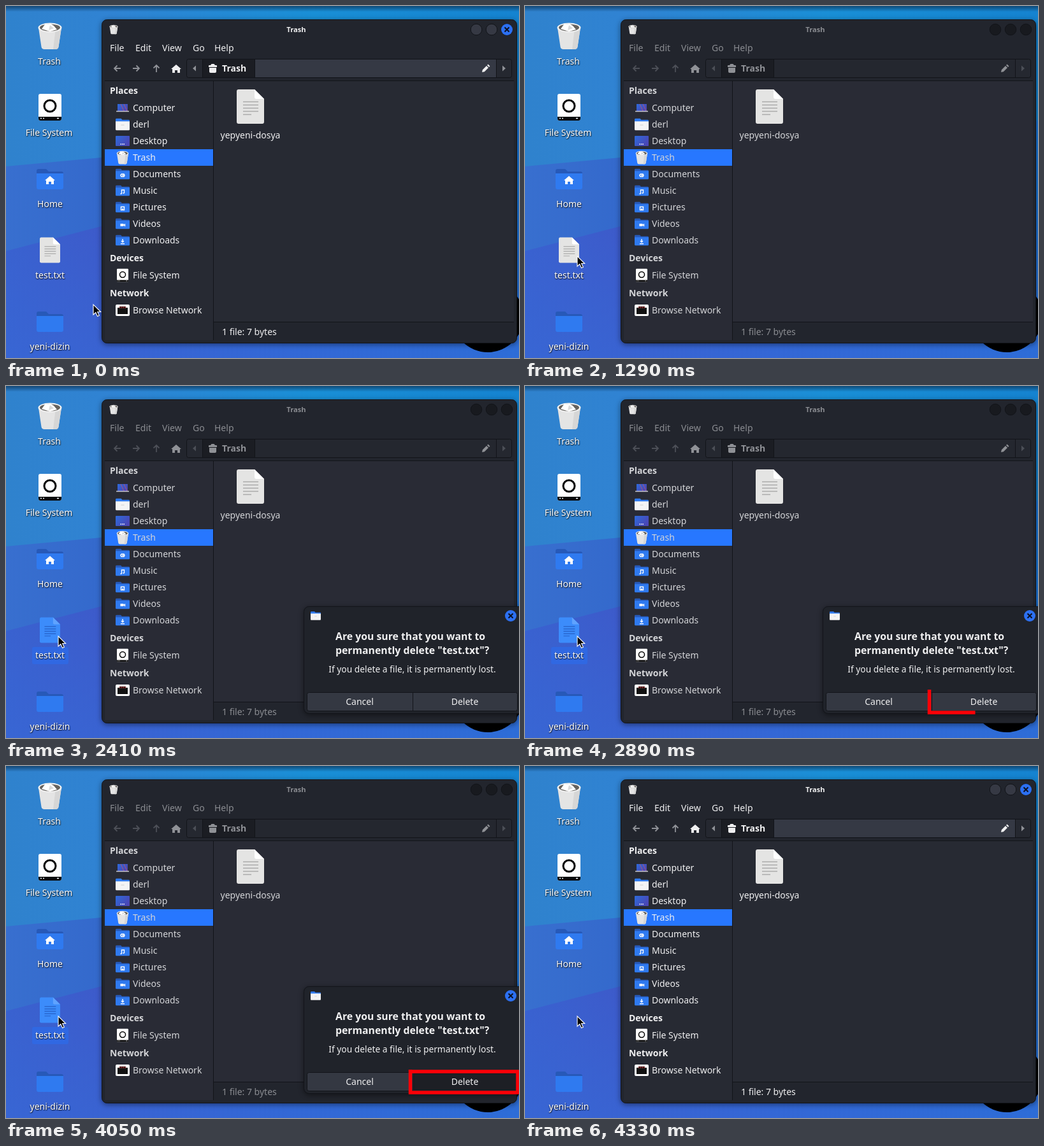
An HTML page that plays this animation: 805x553 px, repeating every 6.27 s.

```html
<!DOCTYPE html>
<html lang="en">
<head>
<meta charset="utf-8">
<title>Permanent delete</title>
<style>
html, body { margin: 0; width: 100%; height: 100%; overflow: hidden; background: #2f80d0; }
svg.stage { display: block; }
text { font: 14px "Noto Sans", "Open Sans", sans-serif; fill: #f0f0f1; white-space: pre; }
text.b { font-weight: 700; }
text.ask { font-size: 15.8px; }
.mid { text-anchor: middle; }
.desk text { fill: #fff; text-anchor: middle; text-shadow: 0 1px 2px #000a, 1px 1px 1px #0008; }
.head { fill: var(--head); }
.tool { fill: var(--tool); }
.body { fill: var(--body); }
.arrow { fill: none; stroke: var(--nav); stroke-width: 1.8; }
.win { filter: drop-shadow(0 2px 4px #0007); }
.key text { font-family: "Liberation Sans", Arial, sans-serif; fill: #000; text-anchor: middle; }
</style>
</head>
<body>
<svg class="stage" width="805" height="553" viewBox="0 0 805 553">
<defs>
  <linearGradient id="sky"><stop offset="0" stop-color="#2f82cd"/><stop offset=".2" stop-color="#3083d3"/><stop offset=".6" stop-color="#198fd6"/><stop offset="1" stop-color="#1583d0"/></linearGradient>
  <linearGradient id="band"><stop offset="0" stop-color="#386fcf"/><stop offset=".19" stop-color="#3469cc"/><stop offset="1" stop-color="#1b78d6"/></linearGradient>
  <linearGradient id="low"><stop offset="0" stop-color="#3a60ce"/><stop offset=".19" stop-color="#3e58c8"/><stop offset=".55" stop-color="#2a68d6"/><stop offset="1" stop-color="#1a76d8"/></linearGradient>
  <linearGradient id="lift" x2="0" y2="1"><stop offset=".3" stop-color="#3768d6" stop-opacity="0"/><stop offset="1" stop-color="#3768d6" stop-opacity=".7"/></linearGradient>
  <linearGradient id="shade" x2="0" y2="1"><stop offset="0" stop-color="#0b3458" stop-opacity=".75"/><stop offset="1" stop-color="#0b3458" stop-opacity="0"/></linearGradient>
  <linearGradient id="screen" x2="1" y2=".6"><stop offset="0" stop-color="#2d6bdc"/><stop offset="1" stop-color="#4a46b4"/></linearGradient>
  <linearGradient id="cap" x2="0" y2="1"><stop offset="0" stop-color="#c6c7c9"/><stop offset="1" stop-color="#b5b6b8"/></linearGradient>

  <symbol id="trash" viewBox="0 0 40 44">
    <path d="M2 9 6.500 39q.5 4 5 4h17q4.500 0 5-4L38 9z" fill="#e4e4e4"/>
    <path d="M29 9h9l-4.500 30q-.5 4-5 4H25z" fill="#d6d6d6"/>
    <ellipse cx="20" cy="9" rx="18.500" ry="7.500" fill="#f2f2f2"/>
    <ellipse cx="20" cy="9" rx="16" ry="5.500" fill="#65625e"/>
    <path d="m7 11 5-7 9-1 5 3 5 6-11 3z" fill="#fff"/>
    <path d="m20 5 6 5-8 3z" fill="#d9d9d9"/>
  </symbol>
  <symbol id="disk" viewBox="0 0 36 42">
    <rect width="36" height="42" rx="3" fill="#fff"/>
    <circle cx="18" cy="19" r="9" fill="none" stroke="#000" stroke-width="3"/>
    <path d="M0 36h36v3q0 3-3 3H3q-3 0-3-3z" fill="#0a0a0a"/>
    <path d="M3 38.500h2m2 0h2m20 0h3" stroke="#fff" stroke-width="1.500"/>
  </symbol>
  <symbol id="folder" viewBox="0 0 42 32">
    <path d="M0 3q0-3 3-3h12l4 4h20q3 0 3 3v10H0z" fill="#2759b8"/>
    <path d="M0 7h42v22q0 3-3 3H3q-3 0-3-3z" fill="#2f7af0"/>
  </symbol>
  <symbol id="user" viewBox="0 0 42 36">
    <path d="M0 3q0-3 3-3h13l4 4h19q3 0 3 3v10H0z" fill="#2f7af0"/>
    <path d="M0 9h42v24q0 3-3 3H3q-3 0-3-3z" fill="#f4f4f5"/>
    <path d="M16 20h10" stroke="#ddd" stroke-width="3"/>
  </symbol>
  <symbol id="sheet" viewBox="0 0 43 54">
    <path d="M3 0h25l15 15v36q0 3-3 3H3q-3 0-3-3V3q0-3 3-3z" fill="var(--paper, #e4e4e3)"/>
    <path d="m28 0 15 15H31q-3 0-3-3z" fill="var(--fold, #fff)"/>
    <path d="M10 19.500h24M10 24.500h24M10 29.500h24M10 34.500h24M10 39.500h13" stroke="var(--rule, #aaa)" stroke-width="1.500"/>
  </symbol>
  <path id="home" d="M0-7 8 0H6v6H2V2h-4v4h-4V0h-2z"/>
  <g id="laptop">
    <path d="M-8-6H8V5H-8z" fill="url(#screen)"/>
    <path d="m-3-6 5 11M2-6 7 5" stroke="#c0586a" stroke-width=".8"/>
    <path d="M-10 5.500h20" stroke="#c9cad0" stroke-width="1.500"/>
  </g>
  <g id="desktop">
    <rect x="-11" y="-8" width="22" height="16" rx="1" fill="url(#screen)"/>
    <path d="M-3.500 5h1.500m1 0H.5m1 0H3" stroke="#fff" stroke-width="1.500"/>
  </g>
  <g id="plug">
    <rect x="-11" y="-9" width="22" height="18" rx="2" fill="#fff"/>
    <path d="M-8-4h3v-2H5v2h3V6H-8z" fill="#111"/>
    <path d="M-4-6v3m2.700-3v3M1.300-6v3M4-6v3" stroke="#d64545"/>
  </g>
  <g id="cross"><circle r="9" fill="#2c70f2"/><path d="m-3.500-3.500 7 7m0-7-7 7" stroke="#0b1020" stroke-width="2"/></g>
</defs>

<!-- wallpaper -->
<rect width="805" height="553" fill="url(#sky)"/>
<path d="M0 252 150 238 805 190V553H0z" fill="url(#band)"/>
<path d="M0 385 150 346 805 180V553H0z" fill="url(#low)"/>
<path d="M0 385 150 346 805 180V553H0z" fill="url(#lift)"/>
<rect width="805" height="9" fill="url(#shade)"/>
<circle cx="756" cy="488" r="56"/>

<!-- desktop icons -->
<g class="desk">
  <use href="#trash" x="49" y="25" width="40" height="44"/><text x="68" y="92">Trash</text>
  <use href="#disk" x="51" y="138" width="36" height="42"/><text x="67.500" y="204">File System</text>
  <use href="#folder" x="48" y="256" width="42" height="32"/><use href="#home" x="69" y="274" fill="#fff"/><text x="69" y="316">Home</text>
  <g id="file">
    <rect id="pick" x="41" y="410" width="57" height="27" rx="3" fill="#3068e2"/>
    <use href="#sheet" x="53" y="363" width="32" height="41"/><text x="69" y="428">test.txt</text>
  </g>
  <use href="#folder" x="48" y="480" width="42" height="32"/><text x="69" y="540">yeni-dizin</text>
</g>

<!-- file manager -->
<g class="win">
  <rect x="150.500" y="21.500" width="651" height="508" rx="8" fill="#22252d" stroke="#121419"/>
  <use href="#trash" x="162" y="29" width="14" height="16"/>
  <text class="b mid head" x="455.500" y="41" style="font-size:11.200px">Trash</text>
  <g fill="var(--knob)" stroke="#121419"><circle cx="738" cy="37" r="8.800"/><circle cx="762" cy="37" r="8.800"/><circle cx="786" cy="37" r="8.800"/></g>
  <use id="close" href="#cross" x="786" y="37"/>
  <g id="menu"></g>
  <path class="arrow" d="M180 98h-10m4.500-4.500L170 98l4.500 4.500M199 98h10m-4.500-4.500L209 98l-4.500 4.500M236 104V93m-4.500 4.500L236 93l4.500 4.500"/>
  <use class="tool" href="#home" x="267" y="99"/>
  <rect x="283.500" y="83.500" width="510" height="29" rx="3" fill="#252830" stroke="#121419"/>
  <path d="M309 84h81v28h-81z" fill="#1b1d23"/>
  <path d="M391 84h378v28H391z" fill="var(--entry)"/>
  <path d="M308.500 84v28M390.500 84v28M769.500 84v28" stroke="#121419"/>
  <path d="m298 93.500-5 4.500 5 4.500zM779 93.500l5 4.500-5 4.500z" fill="var(--nav)"/>
  <path class="tool" d="M318 94q0-1 1-1h2l1.500-2h4l1.500 2h2q1 0 1 1v2h-13zM319 97h11v6q0 2-2 2h-7q-2 0-2-2zM747 104l.8-3.800 6.200-6.200 3 3-6.200 6.200zM755 93l1.500-1.500 3 3L758 96z"/>
  <text class="b tool" x="339" y="103">Trash</text>
  <path d="M155 118h170v407H155zM326 118h471v378H326z" fill="var(--view)"/>
  <path d="M155 117.500h642M325.500 118v407M326 496.500h471" stroke="#121419"/>
  <path d="M155 225h170v26H155z" fill="#2777ff"/>
  <g id="side"></g>
  <use href="#sheet" x="362" y="131" width="43" height="54"/>
  <text class="mid body" x="383.500" y="208">yepyeni-dosya</text>
  <text class="head" x="339" y="517">1 file: 7 bytes</text>
</g>

<!-- key caps -->
<g id="keys" class="key">
  <g fill="url(#cap)" stroke="#1c1c1c" stroke-width="2">
    <rect x="204" y="457" width="196" height="95" rx="9"/><rect x="503" y="457" width="97" height="95" rx="9"/>
  </g>
  <g fill="none" stroke="#e6e6e7" stroke-width="1.500">
    <rect x="206" y="459" width="192" height="91" rx="7"/><rect x="505" y="459" width="93" height="91" rx="7"/>
  </g>
  <text x="303" y="528" style="font-size:65px">Shift</text>
  <path d="M427 504.500h51M452.500 479v50" stroke="#000" stroke-width="9.500"/>
  <text x="552" y="514" style="font-size:25px">Delete</text>
</g>

<!-- confirmation -->
<g id="dialog">
  <g class="win">
    <rect x="467.500" y="346.500" width="350" height="168" rx="8" fill="#20232a" stroke="#121419"/>
    <use href="#user" x="478" y="354" width="16" height="14"/>
    <use href="#cross" x="792" y="361"/>
    <text class="b ask" x="517" y="399">Are you sure that you want to</text>
    <text class="b ask" x="517" y="421">permanently delete "test.txt"?</text>
    <text class="mid" x="637.500" y="450" style="font-size:13.800px">If you delete a file, it is permanently lost.</text>
    <rect x="472.500" y="481.500" width="330" height="29" rx="3" fill="#343842" stroke="#121419"/>
    <rect id="press" x="640" y="483" width="161" height="26" fill="#1d1f25" stroke="#121419"/>
    <path d="M638.500 482v28" stroke="#121419"/>
    <text class="mid" x="555" y="501">Cancel</text><text class="mid" x="720" y="501">Delete</text>
  </g>
  <path id="mark" d="M634.500 477V513H803V480H632" fill="none" stroke="#fb0007" stroke-width="5.500"/>
</g>

<path id="pointer" d="M0 0v16l3.800-3.500 2.800 6 2.700-1.200-2.700-5.800h5z" stroke="#fff" stroke-width="1.100"/>
</svg>

<script>
const $ = id => document.getElementById(id);
const clamp = v => Math.max(0, Math.min(1, v));
const label = (str, x, y, cls) => `<text class="${cls}" x="${x}" y="${y}">${str}</text>`;
const icon = (id, y, w, h) => `<use href="#${id}" x="${183 - w / 2}" y="${y - h / 2}" width="${w}" height="${h}"/>`;
const emblem = (d, y) => icon('folder', y, 22, 17) +
  `<path transform="translate(183 ${y + 2})" d="${d}" fill="none" stroke="#fff" stroke-width="1.400"/>`;
const plain = (id, y) => `<use href="#${id}" x="183" y="${y}"/>`;

$('menu').innerHTML = [['File', 163], ['Edit', 203], ['View', 245], ['Go', 293], ['Help', 327]]
  .map(([s, x]) => label(s, x, 71, 'head')).join('');

const places = [
  ['Computer', y => plain('laptop', y)],
  ['derl', y => icon('user', y, 22, 19)],
  ['Desktop', y => plain('desktop', y)],
  ['Trash', y => icon('trash', y, 20, 22)],
  ['Documents', y => emblem('M-2-2h4q2 2 0 4h-4q-2-2 0-4M-1 0h3', y)],
  ['Music', y => emblem('M-1.500 3v-6h4v5M-3.500 3h2M.5 2h2', y)],
  ['Pictures', y => emblem('M-2.500-2.500h5v5h-5zM-1 1h2', y)],
  ['Videos', y => emblem('M-3.500-1.200h5m-5 1.200h7m-7 1.200h5m2-3v4', y)],
  ['Downloads', y => emblem('M0-4v5M-2-1 0 1l2-2M-3 3.500h6', y)]
];
const row = (name, y, art) => art(y) + label(name, 199, y + 5, 'body');
const title = (name, y) => label(name, 163, y + 5, 'b body');
$('side').innerHTML = title('Places', 133) +
  places.map(([name, art], i) => row(name, 160 + 26 * i, art)).join('') +
  title('Devices', 396) + row('File System', 423, y => icon('disk', y, 18, 21)) +
  title('Network', 451) + row('Browse Network', 478, y => plain('plug', y));

// Colours of the focused and unfocused window
const quick = { head: ['f0f0f1', '8a8c91'], knob: ['363944', '181a1f'], body: ['f0f0f1', 'd4d5d8'], view: ['272a33', '292b35'] };
const slow = { tool: ['f0f0f1', '8f9196'], nav: ['8f9197', '4c4f57'], entry: ['353944', '24272f'] };
const rgb = hex => [0, 2, 4].map(i => parseInt(hex.slice(i, i + 2), 16));
function tint(set, k) {
  for (const name in set) {
    const [a, b] = set[name].map(rgb);
    document.documentElement.style.setProperty('--' + name, `rgb(${a.map((v, i) => Math.round(v + (b[i] - v) * k))})`);
  }
}

const LOOP = 6270, STEP = 70;
const mark = $('mark'), markLength = mark.getTotalLength();
const show = (id, on) => $(id).style.display = on ? '' : 'none';
const steps = (t, start) => t < start ? 0 : Math.floor((t - start) / STEP) + 1;

function draw(t) {
  const away = t >= 1010 && t < 4120;
  tint(quick, away ? 1 : 0);
  tint(slow, t < 4120 ? clamp(steps(t, 1080) / 4) : 1 - clamp(steps(t, 4120) / 4));
  show('close', !away);

  const travel = 1 - (1 - clamp(steps(t, 1010) / 5)) ** 1.15;
  $('pointer').setAttribute('transform', `translate(${137 - 55 * travel} ${469 - 76 * travel})`);

  const picked = t >= 1350;
  show('file', t < 4190);
  show('pick', picked);
  const style = $('file').style;
  style.setProperty('--paper', picked ? '#3c8cfb' : '#e4e4e3');
  style.setProperty('--fold', picked ? '#5fa3ff' : '#fff');
  style.setProperty('--rule', picked ? '#2560c8' : '#aaa');

  show('keys', t >= 1420 && t < 2410);
  show('dialog', t >= 2410 && t < 4120);
  show('press', t >= 4050);
  const drawn = t >= 3650 ? markLength : Math.min(markLength, 27 * steps(t, 2680));
  show('mark', drawn > 0);
  mark.setAttribute('stroke-dasharray', `${drawn} 999`);
}

function tick() {
  draw(performance.now() % LOOP);
  requestAnimationFrame(tick);
}
tick();
</script>
</body>
</html>
```
